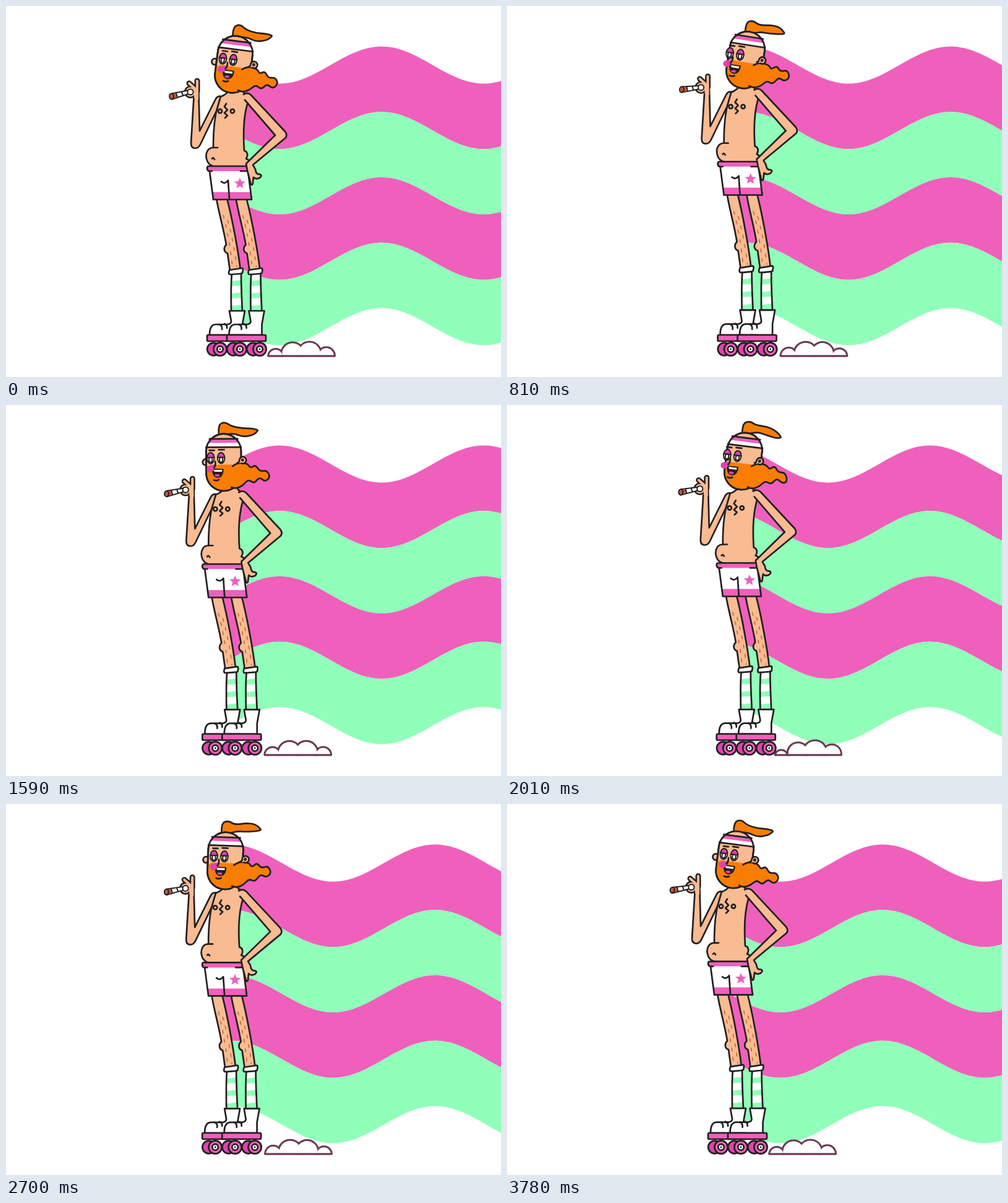
Recreate the animation shown at these times as an HTML page. Size 800 px wide and 600 px high, loop 3810 ms.

```html
<!DOCTYPE html>
<html lang="en">
<head>
<meta charset="utf-8">
<title>Roller skater</title>
<style>
  html, body { margin: 0; width: 100%; height: 100%; overflow: hidden; background: #fff; }
  svg { display: block; width: 800px; height: 600px; }
  .ink { stroke: #231f20; stroke-width: 2.7; stroke-linecap: round; stroke-linejoin: round; fill: none; }
  .thin { stroke-width: 2; }
  .skin { fill: #f9bb92; }
  .white { fill: #fff; }
  .pink { fill: #ef60bc; }
  .hot { fill: #df43ae; }
  .green { fill: #90ffb9; }
  .orange { fill: #f97d03; }
  .dark { fill: #231f20; }
  .ember { fill: #c4583f; }
  .hairs { fill: none; stroke: #c96a2b; stroke-width: 1.6; stroke-dasharray: 6 9; }
  .finger { fill: none; stroke: #231f20; stroke-width: 9; stroke-linecap: round; stroke-linejoin: round; }
  .fill { stroke: #f9bb92; stroke-width: 4; }
  .dust { stroke: #6a3850; stroke-width: 6; stroke-linecap: round; }
</style>
</head>
<body>
<svg viewBox="0 0 800 600">
  <defs>
    <clipPath id="behind"><path d="M370 0L365 150L360 240L345 320L370 425L372 532L395 532V600H900V0Z"/></clipPath>
    <clipPath id="floor"><rect x="400" y="500" width="160" height="67.3"/></clipPath>
    <clipPath id="beardArea"><path d="M330 104L340 98H395V150H330Z"/></clipPath>
    <path id="wave"/>
    <path id="skull" d="M333.5 75A28.3 28.3 0 0 1 390 75V114A28.3 28.3 0 0 1 333.5 114Z"/>
    <g id="leg">
      <path class="ink skin" d="M340 311C344 335 352 362 356 386C351 391 352 398 358 400L362 428H379C376 400 366 345 357 311Z"/>
      <path class="hairs" d="M351 338Q362 380 366 422M358 346Q369 385 373 422"/>
      <path class="white" d="M365 433C363 450 364 475 364 495H382C381 475 380 452 380 431Z"/>
      <path class="green" d="M364 445L381 443V452L364 453ZM364 465L381 463V472L364 473ZM364 485L382 483V492H364Z"/>
      <path class="ink" d="M365 433C363 450 364 475 364 494M380 431C380 452 381 475 382 494"/>
      <path class="ink white" d="M361 427L381 424Q383 424 383 427L382 432L378 433L366 434L362 434Q360 434 360 431Z"/>
      <path class="ink white" d="M361 493H386L382 515V532H329C329 523 331 515 339 515H358Q364 514 364 510Z"/>
      <path class="ink" d="M345 515Q350 517 349 523M353 514Q358 516 357 521"/>
    </g>
    <g id="wheel">
      <circle class="ink hot" cx="-10.5" cy="555" r="10.3"/>
      <circle class="ink pink" cy="555" r="10.6"/>
      <circle class="ink white" cy="555" r="4.8"/>
      <circle class="dark" cy="555" r="1.4"/>
    </g>
    <g id="eye">
      <ellipse class="white" rx="5.8" ry="8.8"/>
      <path class="hot" d="M-5.8 -1A5.8 8.8 0 0 1 5.8 -1Z"/>
      <ellipse class="ink thin" rx="5.8" ry="8.8"/>
      <path class="ink thin white" d="M-2.6 -1V4A2.6 2.6 0 0 0 2.6 4V-1Z"/>
      <path class="ink thin" d="M-5.8 -1H5.8"/>
    </g>
  </defs>

  <g id="scene">
    <g clip-path="url(#behind)" id="flag"></g>

    <g clip-path="url(#floor)">
      <g id="dustLine" class="dust"></g>
      <g id="dustFill" class="white"></g>
    </g>
    <path id="ground" class="dust" style="stroke-width:3"/>

    <g id="legs"><use href="#leg"/><use href="#leg" x="31.5"/></g>

    <rect class="ink pink" x="325" y="532" width="63" height="10" rx="2"/>
    <rect class="ink pink" x="357" y="532" width="63" height="10" rx="2"/>
    <use href="#wheel" x="346"/><use href="#wheel" x="378"/><use href="#wheel" x="410"/>

    <g id="body">
      <path class="ink skin" d="M346 147C337 175 335 200 335 229C326 229 322 238 324 247C326 256 333 260 340 260H392C395 253 393 248 388 247C392 241 390 235 385 234C383 205 384 175 392 152L388 142Q383 141 380 133H362Q358 143 346 147Z"/>
      <path class="ink" d="M335 229H342M333 247Q335 244 337 248M356 158L353 163L358 168L353 173L358 177L354 181"/>
      <circle class="ink" cx="346" cy="170" r="3.1"/>
      <circle class="ink" cx="366" cy="170" r="3.1"/>

      <path class="white" d="M329 265L335 313H397L390 262Z"/>
      <path class="pink" d="M333.6 301H395.4L397 313H335Z"/>
      <path class="pink" d="M328 259H390V267H328Q325 266 325 262Q325 259 328 259Z"/>
      <path class="ink" d="M333 267H328Q325 266 325 262Q325 259 328 259H390L397 313H335L329 267M379 267H390M348 284Q354 289 359 282L361 313"/>
      <path class="pink" id="star"/>

      <path class="ink skin" d="M386 152L435 209L388 255L390 266L396 289Q399 290 399 285L400 277Q404 281 410 278Q415 274 410 272Q404 273 403 264L399 257L452 213Q455 208 451 203L396 144Q390 139 384 143"/>
      <path class="ink skin" d="M304 140L299 222Q299 230 306 230Q311 230 314 224L340 170L347 146Q341 145 338 152L313 202L311 125"/>
      <path class="finger" d="M309 121V138M296 125L305 133"/>
      <circle class="ink skin" cx="298" cy="139" r="9"/>
      <path class="finger fill" d="M309 121V150M296 125L306 134L306 148"/>
      <g id="joint">
        <path class="ink thin white" d="M297 136L268 141.5Q264 147 268 151L298 141Z"/>
        <path class="ember" d="M275 141L268 142Q264 147 268 150.5L276 147.5Z"/>
        <path class="ink thin" d="M275 141L277 147M284 139.5L286 144"/>
        <ellipse class="ink thin ember" cx="267.5" cy="146.2" rx="3.4" ry="4.6"/>
      </g>
      <circle class="ink thin white" cx="298" cy="139" r="4.6"/>

      <g id="head">
        <path id="pony" class="ink orange"/>
        <g id="earL"><circle class="ink skin" cx="332" cy="94" r="5"/></g>
        <use href="#skull" class="ink skin"/>
        <path class="white" d="M338.5 57H385Q389 62 390 70H333.5Q334.5 62 338.5 57Z"/>
        <path class="pink" d="M338.5 57H385L388 63H335.5Z"/>
        <path class="ink" d="M339 56.5H384.5M333.5 70H390"/>
        <use href="#skull" class="orange" clip-path="url(#beardArea)"/>
        <use href="#skull" class="ink"/>
        <path id="tail" class="ink orange"/>
        <g id="earR">
          <path class="ink skin" d="M383 95Q386 95 386 91A5.5 5.5 0 1 1 389 96"/>
          <circle class="ink thin" cx="391" cy="91" r="1.5"/>
        </g>
        <g id="face">
          <path class="ink" d="M337 75H345M352 74H361"/>
          <use href="#eye" x="339" y="87.5"/><use href="#eye" x="356" y="87.5"/>
          <path class="ink dark" d="M342 106H358.5C358.5 115 354 119 349 118C344 117 343 112 342 106Z"/>
          <path class="white" d="M344 106.5H357.5L357 109.7H345Z"/>
          <ellipse class="hot" cx="349.5" cy="115.5" rx="4" ry="2"/>
          <path class="ink" d="M344 123Q348 125 352 122.5"/>
        </g>
        <g id="nose">
          <path class="hot" d="M345 98L335 100.5C330 103 332 111 338 110.5C343 110 345 105 345 98Z"/>
          <path class="ink" d="M346 93Q347 99 344 103"/>
        </g>
      </g>
    </g>
  </g>
</svg>
<script>
const $ = id => document.getElementById(id);
const NS = 'http://www.w3.org/2000/svg';
const TAU = Math.PI * 2;
const STEP = 30, LOOP = 3810, PUFFS = 4, BAND = 105.75;

const set = (el, attrs) => { for (const k in attrs) el.setAttribute(k, attrs[k]); return el; };
const add = (parent, tag, attrs) => parent.appendChild(set(document.createElementNS(NS, tag), attrs));
const move = (id, x, y = 0) => set($(id), { transform: `translate(${x} ${y})` });
const pt = (x, y) => x.toFixed(2) + ' ' + y.toFixed(2);

// Open curve that rounds the corners of a point list
function smooth(p) {
  let d = 'M' + pt(...p[0]);
  for (let i = 1; i < p.length - 1; i++) {
    const [x, y] = p[i], [nx, ny] = p[i + 1];
    d += 'Q' + pt(x, y) + ' ' + pt((x + nx) / 2, (y + ny) / 2);
  }
  return d + 'L' + pt(...p[p.length - 1]);
}

['pink', 'green', 'pink', 'green'].forEach((c, i) =>
  add($('flag'), 'use', { href: '#wave', class: c, y: i * BAND }));

const puffs = Array.from({ length: PUFFS }, () =>
  [add($('dustLine'), 'circle', {}), add($('dustFill'), 'circle', {})]);

set($('star'), { d: 'M' + Array.from({ length: 10 }, (_, i) => {
  const r = i % 2 ? 4.2 : 9.5, a = i * TAU / 10;
  return pt(378 + r * Math.sin(a), 287 - r * Math.cos(a));
}).join('L') + 'Z' });

const ponyTop = [[354, 47], [353, 34], [364, 29], [375, 36], [393, 36], [408, 37], [417, 42]];
const ponyLow = [[417, 44], [410, 48], [393, 50], [380, 47], [368, 49]];
const beardTail = [[376, 101], [383, 95], [400, 96], [405, 104], [413, 97], [420, 107], [431, 104],
  [437, 115], [429, 123], [419, 116], [411, 128], [401, 122], [393, 132], [382, 137], [374, 135]];

function drawWave(f) {
  const top = [], low = [];
  for (let x = 340; x <= 840; x += 4) {
    const y = 95.5 - 30 * Math.cos((x - 607) / 330 * TAU - f / 21 * TAU);
    top.push(pt(x, y));
    low.unshift(pt(x, y + BAND));
  }
  set($('wave'), { d: 'M' + [...top, ...low].join('L') + 'Z' });
}

function drawDust(f) {
  let left = 999, right = 0;
  puffs.forEach((pair, i) => {
    const u = (0.1 + f / 21 + i / PUFFS) % 1;
    const s = Math.sin(Math.PI * u);
    const r = 9 + 10.5 * s, h = 6 + 18 * s;
    const cx = 425 + 109 * u, cy = 566 - h + r;
    pair.forEach(c => set(c, { cx, cy, r: r - 1.5 }));
    const half = Math.sqrt(r * r - (h - r) ** 2);
    left = Math.min(left, cx - half);
    right = Math.max(right, cx + half);
  });
  set($('ground'), { d: `M${left + 1} 566H${right - 1}` });
}

function drawHair(a) {
  const flutter = ([x, y]) => {
    const u = Math.max(0, (x - 358) / 58);
    return [x, y + 6 * u * Math.cos(a - 4 * (u - 0.55))];
  };
  set($('pony'), { d: smooth([...ponyTop, ...ponyLow].map(flutter)) });
  const sway = ([x, y]) => {
    const u = Math.max(0, (x - 376) / 60);
    return [x, y + 5 * u * u * Math.cos(a - 1.2 - 4 * (u - 1))];
  };
  set($('tail'), { d: smooth(beardTail.map(sway)) });
}

function draw(f) {
  const swing = m => Math.cos((f - m) / 42 * TAU);
  const bob = 3.75 * (Math.cos(f * 0.28 * TAU) - 1);
  const lean = -swing(12.5);
  const turn = 4.5 * swing(3);

  move('scene', 3.86 - 12.5 * swing(8.4));
  move('body', 0, bob);
  set($('legs'), { transform: `translate(0 531) scale(1 ${1 - bob / 218}) translate(0 -531)` });
  set($('joint'), { transform: `rotate(${-bob} 298 139)` });
  set($('head'), { transform: `translate(${2 * lean} 0) rotate(${5.5 + 6 * lean} 365 140)` });
  move('face', turn);
  move('nose', turn * 1.3);
  move('earL', 2 - turn * 0.8);
  move('earR', turn * 0.7);

  drawWave(f);
  drawDust(f);
  drawHair(f / 10.5 * TAU);
}

const start = performance.now();
function tick() {
  const t = Math.max(0, performance.now() - start) % LOOP;
  draw(Math.floor(t / STEP));
  requestAnimationFrame(tick);
}
tick();
</script>
</body>
</html>
```
